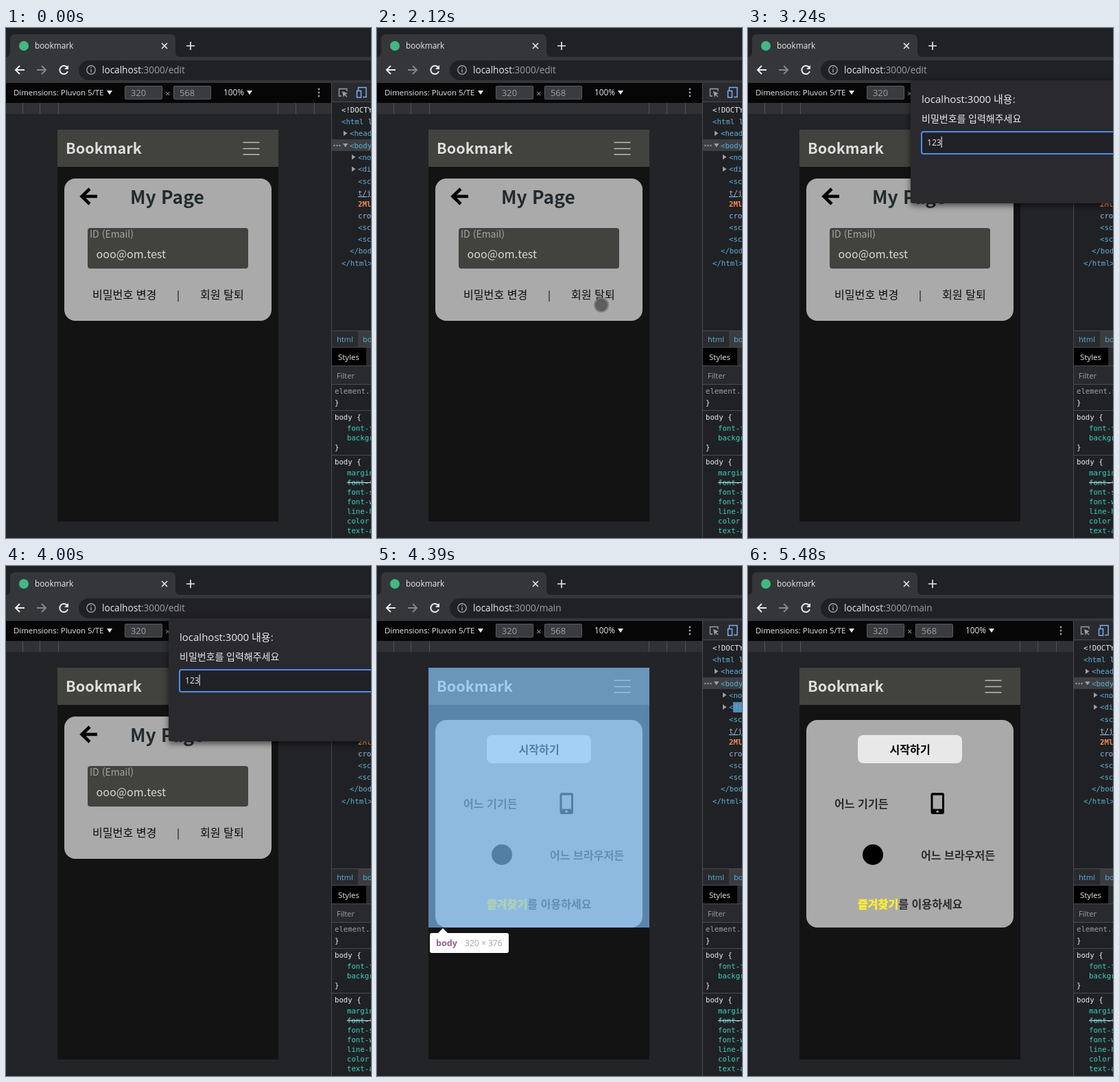
An HTML page that plays this animation: 532x742 px, repeating every 5.51 s.

```html
<!DOCTYPE html>
<html lang="ko">
<head>
<meta charset="utf-8">
<title>Bookmark</title>
<style>
html, body { margin: 0; width: 100%; height: 100%; overflow: hidden; background: #202124; }
svg { display: block; width: 532px; height: 742px; }
text { white-space: pre; }
.ui { font-family: 'Open Sans', 'Noto Sans CJK KR', sans-serif; fill: #e8eaed; }
.app { font-family: 'Noto Sans CJK KR', 'Noto Sans CJK', sans-serif; font-size: 16.1px; }
.code { font: 10.7px 'DejaVu Sans Mono', monospace; fill: #5db0d7; }
.prop { fill: #35d4c7; }
.white { fill: #e8eaed; }
.grey { fill: #9aa0a6; }
.b { font-weight: 700; }
.m { font-weight: 500; }
.line { fill: none; stroke: #e8eaed; stroke-width: 2; }
.rule { stroke: #494c50; }

/* hard cuts */
.edit, .main, .dialog, .hover, .k1, .k2, .k3 { animation: 5510ms step-end infinite; }
.edit { animation-name: edit; }
.main { animation-name: main; }
.dialog { animation-name: dialog; }
.hover { animation-name: hover; }
.k1 { animation-name: key1; }
.k2 { animation-name: key2; }
.k3 { animation-name: key3; }
.caret { animation: caret 5510ms step-end infinite; }
.flash { animation: flash 5510ms linear infinite; }
.touch { animation: touch 5510ms ease-in-out infinite; }
@keyframes edit { 0% { visibility: visible; } 76.23%, 100% { visibility: hidden; } }
@keyframes main { 0% { visibility: hidden; } 76.23%, 100% { visibility: visible; } }
@keyframes dialog { 0% { opacity: 0; } 42.29% { opacity: 1; } 74.05%, 100% { opacity: 0; } }
@keyframes hover { 0% { opacity: 0; } 78.04% { opacity: 1; } 82.76%, 100% { opacity: 0; } }
@keyframes key1 { 0% { opacity: 0; } 52.63%, 100% { opacity: 1; } }
@keyframes key2 { 0% { opacity: 0; } 55.17%, 100% { opacity: 1; } }
@keyframes key3 { 0% { opacity: 0; } 57.71%, 100% { opacity: 1; } }
@keyframes caret {
  0% { transform: none; }
  52.63% { transform: translateX(6.9px); }
  55.17% { transform: translateX(13.7px); }
  57.71%, 100% { transform: translateX(20.6px); }
}
@keyframes flash {
  0%, 76.22% { opacity: 0; }
  76.23%, 78.6% { opacity: 1; }
  84.75% { opacity: .25; }
  87.1%, 100% { opacity: 0; }
}
@keyframes touch {
  0%, 29.95% { transform: translate(410px, 440px); }
  37.2%, 45% { transform: translate(327px, 403px); }
  47.2% { transform: translate(410px, 380px); }
  60%, 82.76% { transform: translate(410px, 190px); }
  84.75% { transform: translate(362px, 234px); }
  87.1% { transform: translate(350px, 246px); }
  92.55% { transform: translate(352px, 240px); }
  95.8%, 100% { transform: translate(410px, 190px); }
}
</style>
</head>
<body>
<svg viewBox="0 0 532 742">
  <defs>
    <clipPath id="screen"><rect x="75" y="148" width="322" height="570"/></clipPath>
    <filter id="shade" x="-10%" y="-10%" width="120%" height="130%">
      <feDropShadow dx="0" dy="3" stdDeviation="5" flood-color="#000" flood-opacity=".6"/>
    </filter>
  </defs>

  <!-- browser frame -->
  <rect width="532" height="742" fill="#202124"/>
  <path d="M0 42Q6 42 6 35V17Q6 9 14 9H239Q247 9 247 17V35Q247 42 253 42H532V80H0Z" fill="#35363a"/>
  <circle cx="26" cy="26" r="7" fill="#41b883"/>
  <text class="ui" x="42" y="30" font-size="11.8">bookmark</text>
  <path class="line" style="stroke-width:1.6" d="M227 22l8 8m0-8l-8 8M263 26h12m-6-6v12"/>
  <path class="line" d="M27 61H14m6-6l-6 6 6 6"/>
  <path class="line" style="stroke:#85878b" d="M45 61h13m-6-6l6 6-6 6"/>
  <path class="line" d="M89.5 58a6 6 0 1 0 .5 5"/>
  <path d="M91 54v6h-6z" fill="#e8eaed"/>
  <rect x="106" y="47" width="450" height="29" rx="14.5" fill="#202124"/>
  <circle cx="124" cy="61" r="6.2" fill="none" stroke="#9aa0a6" stroke-width="1.4"/>
  <path d="M124 60v4.5M124 57v1.6" stroke="#9aa0a6" stroke-width="1.5"/>
  <text class="ui edit" x="140" y="66" font-size="13.6">localhost<tspan class="grey">:3000/edit</tspan></text>
  <text class="ui main" x="140" y="66" font-size="13.6">localhost<tspan class="grey">:3000/main</tspan></text>

  <!-- device toolbar and ruler -->
  <rect y="80" width="475" height="29" fill="#060607"/>
  <g class="ui">
    <text x="11" y="98" font-size="11.4">Dimensions: Pluvon 5/TE</text>
    <path d="M147 91h8l-4 6zM351 91h8l-4 6z"/>
    <g fill="#3a3b3f" stroke="#5a5c60">
      <rect x="173.5" y="84.5" width="54" height="19" rx="1"/>
      <rect x="244.5" y="84.5" width="54" height="19" rx="1"/>
    </g>
    <text class="grey" x="182" y="98.5" font-size="12.8">320</text>
    <text class="grey" x="232" y="100" font-size="13">×</text>
    <text class="grey" x="253" y="98.5" font-size="12.8">568</text>
    <text x="317" y="98" font-size="11.8">100%</text>
  </g>
  <g fill="#9aa0a6"><circle cx="456" cy="89" r="1.4"/><circle cx="456" cy="94" r="1.4"/><circle cx="456" cy="99" r="1.4"/></g>
  <rect y="109" width="475" height="16" fill="#303135"/>
  <path d="M24.5 109v16M49.5 109v16M76.5 109v16M396.5 109v16M422.5 109v16M449.5 109v16" stroke="#505257"/>
  <rect y="125" width="475" height="617" fill="#232428"/>

  <!-- phone page -->
  <g clip-path="url(#screen)">
    <rect x="75" y="148" width="322" height="570" fill="#131313"/>
    <rect x="75" y="148" width="322" height="54" fill="#42423e"/>
    <text class="app b" x="87" y="183" style="font-size:21.6px" fill="#dedede">Bookmark</text>
    <path d="M345.5 166.5h24m-24 9h24m-24 8.5h24" stroke="#bdbdbb" stroke-width="1.7"/>

    <g class="edit">
      <rect x="85" y="219" width="302" height="207" rx="16" fill="#aaa"/>
      <path d="M133 245H111m11-11l-11.5 11 11.5 11" fill="none" stroke="#000" stroke-width="4.6"/>
      <text class="app b" x="181" y="256" style="font-size:26.4px" fill="#212a2e">My Page</text>
      <rect x="119" y="291" width="234" height="59" rx="4" fill="#42423e"/>
      <text class="app m" x="122" y="305" style="font-size:14px" fill="#a6a6a4">ID (Email)</text>
      <text class="app m" x="131.5" y="335" fill="#d8d8d6">ooo@om.test</text>
      <g class="app m" fill="#0c0c0c">
        <text x="126" y="394">비밀번호 변경</text>
        <text x="283" y="394">회원 탈퇴</text>
        <path d="M251 382v16" stroke="#222" stroke-width="1.2"/>
      </g>
    </g>

    <g class="main">
      <rect x="85" y="224" width="302" height="302" rx="16" fill="#aaa"/>
      <rect x="160" y="246" width="152" height="41" rx="8" fill="#e8e8e8"/>
      <g class="app b" fill="#2b2d2f">
        <text x="206.5" y="273" fill="#000">시작하기</text>
        <text x="126" y="352">어느 기기든</text>
        <text x="252" y="427">어느 브라우저든</text>
        <text x="160" y="498"><tspan fill="#ffee2e" stroke="#ffee2e" stroke-width=".6">즐겨찾기</tspan>를 이용하세요</text>
      </g>
      <rect x="266.5" y="330" width="19.5" height="31" rx="3" fill="#000"/>
      <rect x="269.5" y="333.5" width="13.5" height="20" fill="#aaa"/>
      <circle cx="276.2" cy="357.2" r="1.7" fill="#aaa"/>
      <circle cx="182" cy="420" r="15" fill="#000"/>
    </g>

    <g class="hover">
      <rect x="75" y="148" width="322" height="378" fill="rgb(128,196,254)" fill-opacity=".65"/>
      <path d="M89 534l7-7 7 7h86q3 0 3 3v23q0 3-3 3H80q-3 0-3-3v-23q0-3 3-3z" fill="#fff"/>
      <text class="ui b" x="86" y="553" font-size="12.6" style="fill:#94618f">body</text>
      <text class="ui" x="128" y="553" font-size="12.1" style="fill:#a3a3a3">320 × 376</text>
    </g>

    <g class="touch">
      <circle r="11" fill="#707070" fill-opacity=".7"/>
      <circle r="9" fill="#555" fill-opacity=".8"/>
    </g>
  </g>

  <!-- inspector -->
  <rect x="475" y="80" width="57" height="662" fill="#202124"/>
  <rect x="475" y="80" width="57" height="28" fill="#292a2d"/>
  <path class="rule" d="M474.5 80v662M475 107.5h57"/>
  <path d="M489 99h-3.5V88.5H497V92" fill="none" stroke="#9aa0a6" stroke-width="1.3"/>
  <path d="M490 92l8 3-3.5 1.5 3 3-1 1-3-3-1.5 3.5z" fill="#9aa0a6"/>
  <path d="M513.5 91v-4.5H525v14h-5M511.5 91.5h6v9.5h-6z" fill="none" stroke="#7cacf8" stroke-width="1.5"/>
  <rect x="475" y="162" width="57" height="17" fill="#3c3f43"/>
  <g fill="#9aa0a6">
    <path d="M492 149.5l5.5 3.8-5.5 3.8zM491 168h7.5l-3.7 5.5zM504 184l5.5 3.8-5.5 3.8zM504 201.5l5.5 3.8-5.5 3.8z"/>
    <circle cx="478.5" cy="171" r="1.2"/><circle cx="482.5" cy="171" r="1.2"/><circle cx="486.5" cy="171" r="1.2"/>
  </g>
  <g class="code">
    <text class="white" x="489" y="123">&lt;!DOCTYPE</text>
    <text x="489" y="140">&lt;html <tspan fill="#9bbbdc">lang</tspan></text>
    <text x="501" y="157">&lt;head&gt;</text>
    <text x="501" y="175">&lt;body&gt;</text>
    <text x="513" y="192">&lt;noscript</text>
    <text x="513" y="209">&lt;div</text>
    <text x="513" y="227">&lt;script</text>
    <text x="513" y="244" fill="#9bbbdc" text-decoration="underline">t/js</text>
    <text class="b" x="513" y="260" fill="#f28b54">2Ml</text>
    <text x="513" y="277" fill="#9bbbdc">cross</text>
    <text x="513" y="294">&lt;script</text>
    <text x="513" y="311">&lt;script</text>
    <text x="501" y="328">&lt;/body&gt;</text>
    <text x="489" y="346">&lt;/html&gt;</text>
  </g>
  <rect class="flash" x="519" y="198" width="13" height="15" fill="#5c9fcb"/>
  <rect x="475" y="441" width="57" height="24" fill="#292a2d"/>
  <rect x="513" y="441" width="19" height="24" fill="#3a3c40"/>
  <rect x="475" y="465" width="57" height="54" fill="#292a2d"/>
  <rect x="475" y="465" width="50" height="26" fill="#000"/>
  <path class="rule" d="M475 440.5h57M475 464.5h57M475 491.5h57M475 518.5h57M475 556.5h57M475 621.5h57"/>
  <g class="ui">
    <text x="482" y="457" font-size="11.2" style="fill:#5db0d7">html</text>
    <text x="520" y="457" font-size="11.2" style="fill:#5db0d7">body</text>
    <text x="484" y="483" font-size="11.5">Styles</text>
    <text class="grey" x="482" y="510" font-size="11.1">Filter</text>
  </g>
  <g class="code">
    <text class="grey" x="479" y="532">element.style</text>
    <g class="white">
      <text x="479" y="549">}</text>
      <text x="479" y="570">body {</text>
      <text x="479" y="614">}</text>
      <text x="479" y="635">body {</text>
    </g>
    <g class="prop">
      <text x="497" y="586">font-family</text>
      <text x="497" y="600">background</text>
      <text x="497" y="651">margin</text>
      <text x="497" y="665">font-family</text>
      <text x="497" y="679">font-size</text>
      <text x="497" y="693">font-weight</text>
      <text x="497" y="707">line-height</text>
      <text x="497" y="721">color</text>
      <text x="497" y="735">text-align</text>
    </g>
    <path d="M497 661.5h35" stroke="#e8eaed"/>
  </g>

  <!-- password prompt -->
  <g class="dialog">
    <rect x="237" y="76" width="448" height="179" rx="3" fill="#292a2d" filter="url(#shade)"/>
    <text class="ui" x="253" y="109" font-size="15">localhost:3000 내용:</text>
    <text class="ui m" x="253" y="137" font-size="14">비밀번호를 입력해주세요</text>
    <rect x="253" y="151" width="416" height="32" rx="3" fill="#202124" stroke="#4c8df0" stroke-width="2"/>
    <g class="ui" font-size="12">
      <text class="k1" x="261" y="171">1</text>
      <text class="k2" x="267.9" y="171">2</text>
      <text class="k3" x="274.7" y="171">3</text>
    </g>
    <path class="caret" d="M261.5 158v16" stroke="#fff"/>
  </g>
</svg>
</body>
</html>
```
